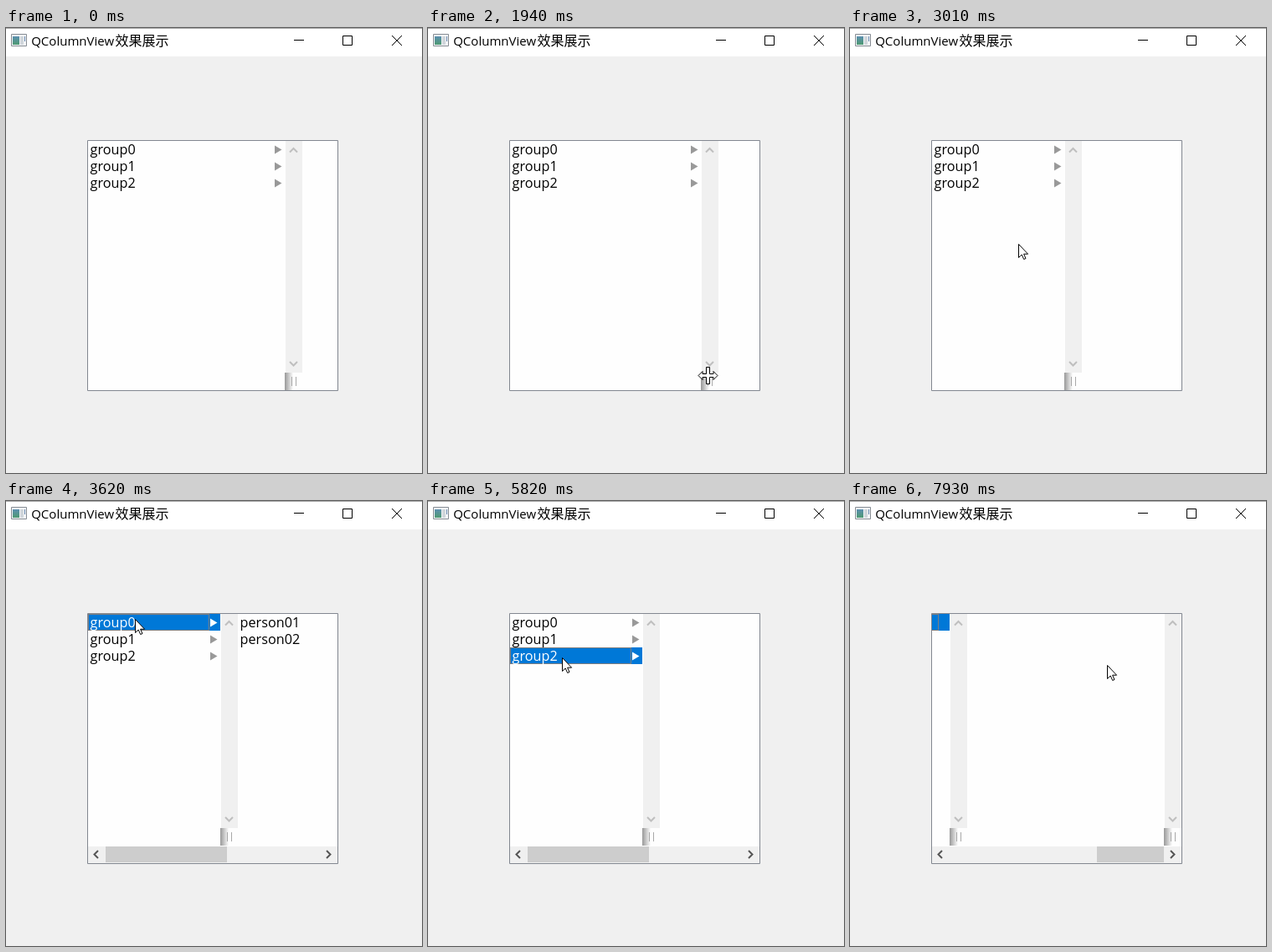
These frames come from a looping animation (497x532 px, 7990 ms). An HTML page:

```html
<!DOCTYPE html>
<html lang="zh">
<head>
<meta charset="utf-8">
<style>
html, body { margin: 0; width: 100%; height: 100%; overflow: hidden; background: #f0f0f0; }
svg { display: block; width: 497px; height: 532px; }
text { font: 16.2px "Open Sans", "Noto Sans", sans-serif; white-space: pre; }
.latin { font-size: 15px; }
.cjk { font: 16px "Noto Sans CJK SC", "Noto Sans CJK", sans-serif; }
.line { fill: none; stroke: #000; }
.chevron { fill: none; stroke: #bfbfbf; stroke-width: 2; }
.dark { stroke: #555; }
.focus { fill: none; stroke: #ff8728; stroke-dasharray: 1 1; }
.pointer { fill: #fff; stroke: #000; }
</style>
</head>
<body>
<svg viewBox="0 0 497 532">
  <defs>
    <linearGradient id="fade"><stop stop-color="#999"/><stop offset="1" stop-color="#fefefe"/></linearGradient>
    <linearGradient id="teal" x2="0" y2="1"><stop stop-color="#5b8fb0"/><stop offset="1" stop-color="#4f9a72"/></linearGradient>
    <clipPath id="inside"><path d="M98 135h298v298h-298z"/></clipPath>
  </defs>
  <path fill="#f0f0f0" d="M0 0h497v532H0z"/>
  <path fill="#fff" d="M0 0h497v34H0z"/>
  <path fill="#aaa" d="M0 0h497v1H0z"/>
  <g>
    <path fill="#f4f6f8" stroke="#858b92" d="M6.5 7.5h18v14h-18z"/>
    <path fill="url(#teal)" d="M8 10h8v10H8z"/>
    <path fill="#d0d6db" d="M17 10h4v10h-4z"/>
    <path fill="#6686ad" d="M22 10h1v6h-1z"/>
  </g>
  <text class="latin" x="30.2" y="21">QColumnView</text>
  <text class="cjk" x="130.5" y="21">效果展示</text>
  <path class="line" d="M344 14.5h12M402.5 9.5h11v11h-11zM461 9l12 12M473 9l-12 12"/>
  <path fill="#fefefe" stroke="#828790" d="M97.5 134.5h299v299h-299z"/>
  <g id="view" clip-path="url(#inside)"></g>
  <g id="cursor"></g>
</svg>
<script>
const LOOP = 7990;
const BLUE = '#0078d7', GREY = '#f0f0f0';
const view = document.getElementById('view');
const cursor = document.getElementById('cursor');

const ARROW = '<path class="pointer" d="M.5 .5V16.5L4.2 13L6.7 18.5L9 17.5L6.6 12.2H11.6Z"/>';
const SPLIT = '<path class="pointer" d="M-11 .5L-6 -4.5V-1.5H-1.5V-9.5H2.5V-1.5H7V-4.5L12 .5L7 5.5V2.5H2.5V10.5H-1.5V2.5H-6V5.5Z"/>';

// Pointer moves: start, end, steps, shape, [progress, x, y]...
const MOVES = [
  [570, 1250, 13, ARROW, [.077, 148, 469], [.385, 205, 261], [.692, 265, 322], [1, 332, 414]],
  [1440, 1680, 5, SPLIT, [0, 335, 415], [1, 341, 415]],
  [1940, 2600, 13, SPLIT, [0, 341, 415], [.692, 277, 413], [1, 264, 413]],
  [2780, 3130, 7, ARROW, [0, 264, 413], [1, 154, 141]],
  [4170, 4300, 3, ARROW, [0, 154, 141], [1, 154, 166]],
  [5370, 5600, 5, ARROW, [0, 154, 166], [1, 160, 187]],
  [6540, 7130, 11, ARROW, [0, 160, 187], [.5, 255, 221], [.91, 357, 162], [1, 352, 149]],
  [7750, 7930, 4, ARROW, [0, 352, 149], [1, 307, 196]]
];
const DRAG = MOVES[2];

// Index of the step showing at time t
function stepAt(t, start, end, steps) {
  const k = Math.floor((t - start) / (end - start) * (steps - 1) + 1e-6);
  return Math.max(-1, Math.min(steps - 1, k));
}

function place(t, [start, end, steps, , ...points]) {
  const u = (stepAt(t, start, end, steps) + 1) / steps;
  let i = 1;
  while (i < points.length - 1 && u > points[i][0]) i++;
  const [ua, xa, ya] = points[i - 1], [ub, xb, yb] = points[i];
  const f = Math.max(0, Math.min(1, (u - ua) / (ub - ua)));
  return [Math.round(xa + (xb - xa) * f), Math.round(ya + (yb - ya) * f)];
}

const rect = (x, y, w, h, fill) => `<rect x="${x}" y="${y}" width="${w}" height="${h}" fill="${fill}"/>`;
const chevron = (d, extra = '') => `<path class="chevron ${extra}" d="${d}"/>`;

// Vertical scroll bar with its resize grip below
function sideBar(x, bottom) {
  const g = bottom - 21;
  return rect(x, 135, 20, g - 135, GREY) +
    chevron(`M${x + 5} 148.5l4.5 -4.5l4.5 4.5`) +
    chevron(`M${x + 5} ${g - 13}l4.5 4.5l4.5 -4.5`) +
    rect(x - 1, g, 21, 21, '#fefefe') +
    rect(x - 1, g, 10, 21, 'url(#fade)') +
    rect(x + 7, g + 5, 1, 11, '#a8a8a8') + rect(x + 12, g + 5, 1, 11, '#a8a8a8');
}

function row(i, label, left, bar, fill, branch) {
  const y = 135 + 20 * i, lit = fill === BLUE;
  let s = fill ? rect(left, y, bar - 1 - left, 20, fill) : '';
  if (lit) s += `<path class="focus" d="M${left + .5} ${y + .5}H${bar - 14.5}V${y + 19.5}H${left + .5}Z"/>`;
  s += `<text x="${left + 2.6}" y="${y + 16}" fill="${lit ? '#fff' : '#000'}">${label}</text>`;
  if (branch) s += `<path fill="${lit ? '#fff' : '#999'}" d="M${bar - 13} ${y + 5.5}l8.5 5l-8.5 5z"/>`;
  return s;
}

function bottomBar(handleX, handleW) {
  return rect(98, 413, 298, 20, GREY) + rect(handleX, 413, handleW, 19, '#cdcdcd') +
    chevron('M110 418l-4.5 4.5l4.5 4.5', 'dark') + chevron('M383 418l4.5 4.5l-4.5 4.5', 'dark');
}

function drawView(t) {
  const bar = place(t, DRAG)[0] - 7;
  const open = t >= 3410, deep = t >= 7380;
  const bottom = open ? 412 : 433;
  const group = t >= 5820 ? 2 : t >= 4670 ? 1 : 0;
  const people = t >= [3620, 4850, 6060][group];
  const slide = deep ? stepAt(t, 7380, 7580, 6) / 5 : 0;
  const ease = slide < .5 ? 2 * slide * slide : 1 - 2 * (1 - slide) ** 2;

  let s = '';
  for (let i = 0; i < 3; i++) {
    const fill = open && !deep && i === group ? (t < 3620 ? GREY : BLUE) : '';
    s += row(i, 'group' + i, 98, bar, fill, true);
  }
  s += sideBar(bar, bottom);
  if (people) {
    for (let i = 0; i < 2; i++) {
      const fill = deep && i === 0 ? (slide > 0 ? BLUE : GREY) : '';
      s += row(i, `person${group}${i + 1}`, 277, 513, fill, false);
    }
  }
  if (open) s += sideBar(513, bottom);
  if (deep) s += sideBar(769, bottom);
  s = `<g transform="translate(${-Math.round(393 * ease)})">${s}</g>`;
  if (open) s += bottomBar(119 + Math.round(176 * ease), deep ? 80 : 145);
  view.innerHTML = s;
}

function drawCursor(t) {
  const move = MOVES.filter(m => t >= m[0]).pop();
  cursor.innerHTML = move ? `<g transform="translate(${place(t, move)})">${move[3]}</g>` : '';
}

function draw(now) {
  const t = now % LOOP;
  drawView(t);
  drawCursor(t);
}

const begin = performance.now();
function tick() {
  draw(performance.now() - begin);
  requestAnimationFrame(tick);
}
tick();
</script>
</body>
</html>
```
